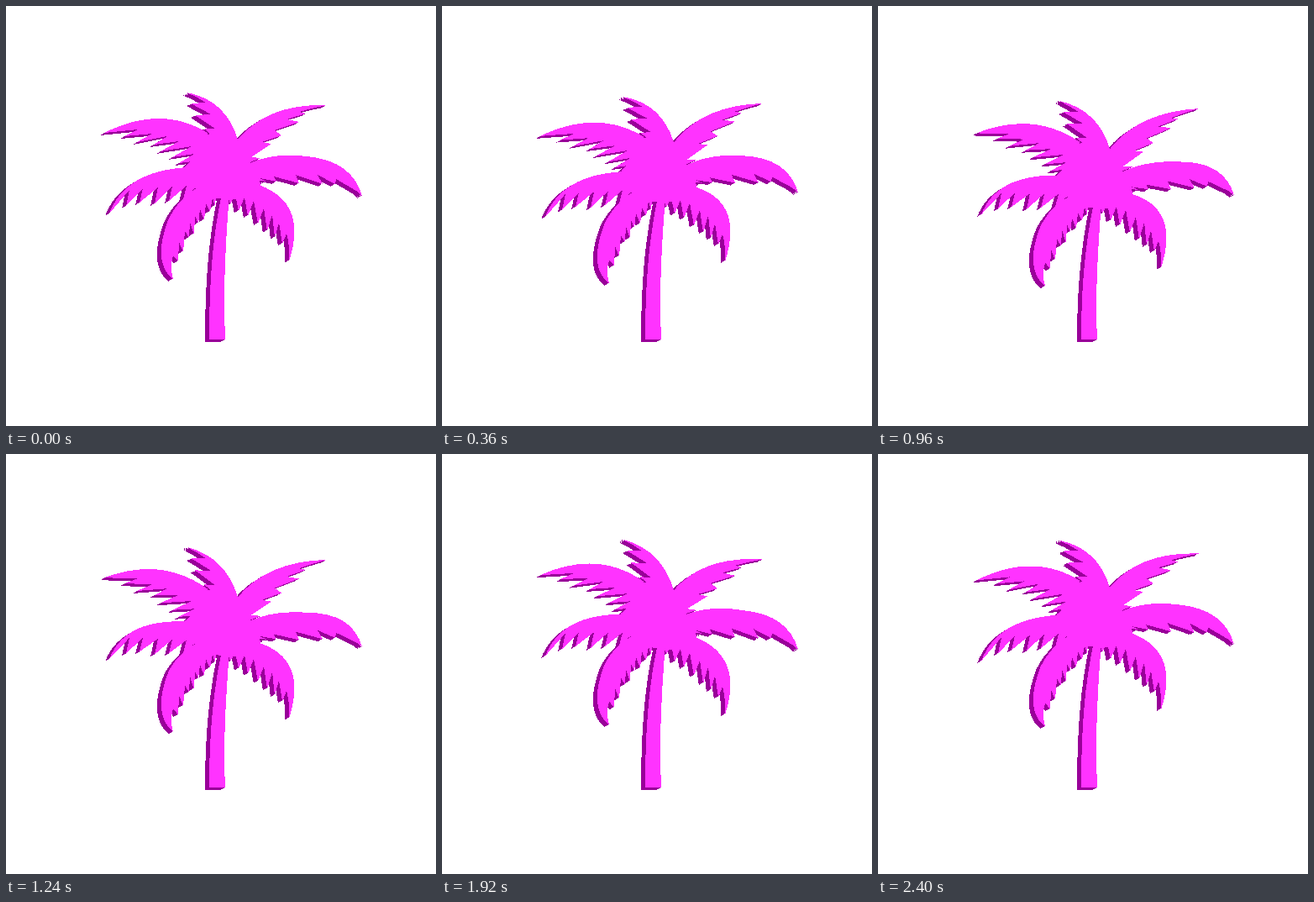
Write an HTML page that moves like this. It is 512 px wide and 500 px high and loops after 2.44 s.

```html
<!DOCTYPE html>
<html lang="en">
<head>
<meta charset="utf-8">
<title>Palm tree</title>
<style>
  html, body { margin: 0; width: 100%; height: 100%; overflow: hidden; background: #fff; }
  svg { display: block; width: 512px; height: 500px; shape-rendering: crispEdges; }
</style>
</head>
<body>
<svg viewBox="0 0 512 500">
  <defs><g id="palm"></g></defs>
  <g id="side" fill="#990099"></g>
  <use href="#palm" fill="#ff33ff"/>
</svg>
<script>
const LOOP = 2440, STEP = 40, AMP = 5.9;
const DEPTH = 5, DEPTH_X = -5, DEPTH_Y = 3;

const parts = [
  // trunk
  'M256 222L266 225Q261 285 260 340L260 380L261 382L261 397L242 397Q242 320 249 270Q252 247 256 229Z',
  // crown
  'M275 158L281 172L291 187L302 206L303 214L275 230L248 229L225 217L213 192L222 182L240 153L250 150Z',
  // top
  'M215 103Q262 112 276 159L266 172L249 157L236 146L249 146L225 130L244 129L220 116L238 115L228 109Z',
  // upper right
  'M276 159Q311 116 382 118Q366 121 349 126L357 128L334 135L349 138L320 148L328 154L305 162L316 164L292 180L303 181L288 187L262 180Z',
  // right
  'M288 188Q318 174 358 179Q412 184 424 226L417 220L393 206L392 212L371 201L377 212L345 201L349 211L319 203L322 209L302 205L310 209L290 206Z',
  // lower right
  'M301 213Q360 234 337 304Q338 285 334 271L329 283L325 258L320 276L317 248L311 268L307 241L300 259L295 232L288 250L284 228L277 244L273 225L267 236L264 224L280 208Z',
  // lower left
  'M230 215Q205 229 193 255Q174 306 199 325Q195 311 199 297L205 304L206 281L211 293L213 268L218 276L219 257L224 272L225 250L229 259L231 242L236 255L238 235L243 245L246 228L249 239L250 226Z',
  // left
  'M123 247Q142 196 217 192L240 205L226 216L211 230L215 214L194 232L198 215L177 235L181 216L159 234L163 217L143 238L147 219Z',
  // upper left
  'M117 151Q185 117 240 151L246 175L212 192L222 185L206 187L224 176L198 180L221 167L184 173L206 161L176 165L192 155L156 162L174 152L141 155L157 147Z'
];

const NS = 'http://www.w3.org/2000/svg';
const add = (parent, tag, attrs = {}) => {
  const el = document.createElementNS(NS, tag);
  for (const k in attrs) el.setAttribute(k, attrs[k]);
  return parent.appendChild(el);
};

const palm = document.getElementById('palm');
const side = document.getElementById('side');
const paths = parts.map(() => add(palm, 'path'));
for (let i = DEPTH; i > 0; i--) {
  const x = DEPTH_X * i / DEPTH, y = DEPTH_Y * i / DEPTH;
  add(side, 'use', { href: '#palm', transform: `translate(${x} ${y})` });
}

// A vertical wave runs from left to right; the foot of the trunk stays put.
const wave = (x, t) => Math.cos(2 * Math.PI * (t - 28 - 4 * x) / LOOP);
const sway = (x, y, t) => {
  const grip = Math.min(1, Math.max(0, (397 - y) / 60));
  return y + AMP * grip * (wave(x, t) - wave(x, 0));
};

function draw(t) {
  parts.forEach((d, i) => {
    paths[i].setAttribute('d', d.replace(/(\d+) (\d+)/g,
      (_, x, y) => `${x} ${sway(+x, +y, t).toFixed(2)}`));
  });
}

const start = performance.now();
function frame() {
  const t = (performance.now() - start) % LOOP;
  draw(Math.floor(t / STEP) * STEP);
  requestAnimationFrame(frame);
}
frame();
</script>
</body>
</html>
```
